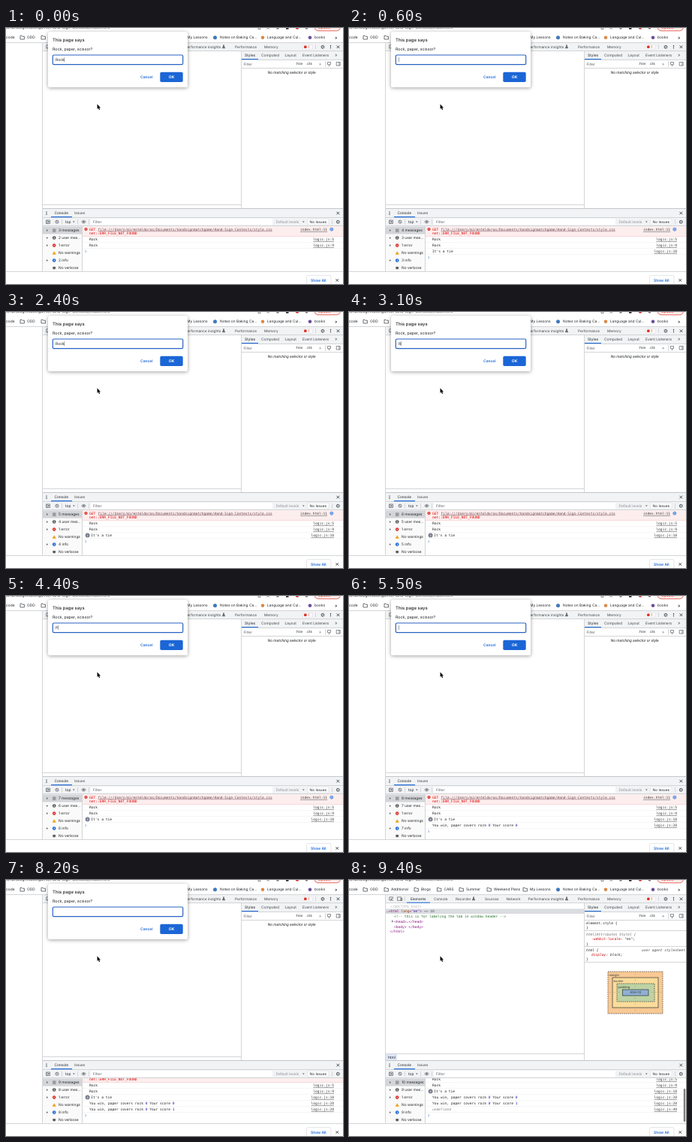
Recreate the animation shown at these times as an HTML page. Size 449 px wide and 341 px high, loop 9.5 s.

```html
<!DOCTYPE html>
<html lang="en">
<head>
<meta charset="utf-8">
<title>Prompt game</title>
<style>
html, body { margin: 0; width: 100%; height: 100%; overflow: hidden; background: #fff; }
svg { display: block; width: 449px; height: 341px; font-family: Inter, Roboto, sans-serif; text-rendering: geometricPrecision; }
.mono { font-family: "DejaVu Sans Mono", monospace; }
.it { font-style: italic; }
.slanted { font-family: Roboto, sans-serif; font-style: italic; }
.link { text-decoration: underline; text-decoration-thickness: .4px; }
.card { filter: drop-shadow(0 1.2px 2.6px rgba(0, 0, 0, .38)); }
</style>
</head>
<body>
<svg viewBox="0 0 449 341">
  <g id="chrome"></g><g id="elements"></g><g id="console"></g><g id="frame"></g><g id="dialog"></g><g id="pointer"></g>
</svg>
<script>
const LOOP = 9500, STEP = 100;
const BLUE = '#1a66d6', RED = '#d93025', GREY = '#5c6166', INK = '#202327', TAB = '#43474b', BAR = '#f1f3f4', EDGE = '#d3d5d8';

// One entry per prompt: when it opens, the keystroke times and when it is confirmed
const rounds = [
  { open: -1000, word: 'Rock', keys: [-400, -300, -200, -100], close: 100 },
  { open: 500, word: 'Rock', keys: [800, 900, 1000, 1000], close: 1100 },
  { open: 1300, word: 'Rock', keys: [2000, 2100, 2200, 2400], close: 2500 },
  { open: 2800, word: 'Rock', keys: [3100, 3200, 3300, 3400], close: 3600 },
  { open: 3900, word: 'Paper', keys: [4200, 4600, 4700, 4800, 4900], close: 5000 },
  { open: 5300, word: 'Paper', keys: [6000, 6100, 6200, 6300, 6600], close: 7100 },
  { open: 7400, word: 'Paper', keys: [8400, 8600, 8700, 8800, 8900], close: 9000 },
];

const esc = s => s.replace(/&/g, '&amp;').replace(/</g, '&lt;');
const rect = (x, y, w, h, fill, more = '') => `<rect x="${x}" y="${y}" width="${w}" height="${h}" fill="${fill}" ${more}/>`;
const circle = (x, y, r, fill, more = '') => `<circle cx="${x}" cy="${y}" r="${r}" fill="${fill}" ${more}/>`;
const path = (d, stroke = GREY, w = .7, fill = 'none') => `<path d="${d}" stroke="${stroke}" stroke-width="${w}" fill="${fill}"/>`;
const hline = (x, y, w, c = EDGE) => rect(x, y, w, 1, c);
const vline = (x, y, h, c = EDGE) => rect(x, y, 1, h, c);
const span = (s, fill) => `<tspan fill="${fill}">${esc(s)}</tspan>`;
// y is the middle of the line of text
const raw = (x, y, markup, size, fill, more = '') =>
  `<text x="${x}" y="${y + size * .36}" font-size="${size}" fill="${fill}" ${more}>${markup}</text>`;
const text = (x, y, s, fill = INK, size = 4.85, more = '') => raw(x, y, esc(s), size, fill, more);
const mono = (x, y, s, fill = '#222', cls = '', more = '') =>
  raw(x, y, esc(s), 4.6, fill, `class="mono ${cls}" ${more}`);
const link = (x, y, s) => mono(x, y, s, '#3c3c3c', 'link', 'text-anchor="end"');
const cross = (x, y, c = INK) => path(`M${x - 1.8} ${y - 1.8}l3.6 3.6m0 -3.6l-3.6 3.6`, c, .8);
const folder = x => path(`M${x} 10.3h2l.8 .9h2.6v3.8h-5.4z`, '#4b4f54', .8);
const dots = (x, y) => [-1.8, 0, 1.8].map(d => circle(x, y + d, .6, INK)).join('');
const gear = (x, y) => circle(x, y, 1.9, 'none', `stroke="${GREY}" stroke-width="1.1" stroke-dasharray="1 .35"`) + circle(x, y, 1.4, 'none', `stroke="${GREY}" stroke-width=".7"`);
const flask = x => path(`M${x - .5} 22.7v1.5l-1.3 2.6h3.6l-1.3 -2.6v-1.5z`, GREY, .6, GREY);
const arrow = (x, y) => path(`M${x} ${y - 1.4}l2 1.4l-2 1.4z`, 'none', 0, GREY);
const down = (x, y) => path(`M${x} ${y - .8}h2.6l-1.3 1.7z`, 'none', 0, GREY);

function browserBar() {
  const marks = [[28, 'ODD'], [56, 'Additional'], [96, 'Blogs'], [126.5, 'CARS'], [156, 'Summer'], [193, 'Weekend Plans'], [241, 'My Lessons']];
  return text(0, -1.2, 's/handsignmatchgame/Hand-Sign-Contests/index.html', '#444', 5.3)
    + path('M336 -1v2.5h3v-2.5M347.5 1.3l1.7 -1l1.7 1') + rect(360.5, -1, 3, 2.5, '#777')
    + rect(373, -1, 3.5, 2.6, '#222') + circle(388, -.3, 2.1, RED) + rect(399, -1, 3, 2.4, '#777')
    + rect(411, -7, 34.5, 10.8, '#fdeceb', `rx="5" stroke="${RED}" stroke-width=".7"`) + text(416, -1, 'Update', RED)
    + text(0, 12.7, 'code') + marks.map(([x, s]) => folder(x - 9) + text(x, 12.7, s)).join('')
    + circle(278.5, 12.7, 2.5, '#3f78bd') + text(285, 12.7, 'Notes on Baking Ca...')
    + circle(342, 12.7, 2.3, '#d98a4a') + text(348, 12.7, 'Language and Cul...')
    + circle(405, 12.7, 2.3, '#6b4d9b') + text(411, 12.7, 'books') + text(438, 12.5, '»', INK, 6)
    + hline(0, 19, 449);
}

function toolbars() {
  const tabs = [[82, 'Elements'], [113, 'Console'], [142, 'Recorder'], [181, 'Sources'], [209.5, 'Network'],
    [238.5, 'Performance insights'], [305, 'Performance'], [344, 'Memory']];
  const panes = [[318, 'Styles'], [340, 'Computed'], [371.5, 'Layout'], [395, 'Event Listeners']];
  return rect(49, 20, 400, 11, BAR) + hline(49, 30, 400)
    + path('M57 27h-3.2v-4.2h4.6v2M56 25l3 3M56 25v2.2M56 25h2.2') + path('M64.5 22.8h5v4.5h-5zM69 24.3h2v3h-2z') + vline(74, 22, 6)
    + tabs.map(([x, s]) => text(x, 25.1, s, x < 90 ? INK : TAB, 4.75)).join('')
    + rect(77, 29.6, 31, 1, BLUE) + flask(166) + flask(290)
    + rect(395, 22.2, 13, 6, '#fff', `rx="1" stroke="${EDGE}" stroke-width=".5"`) + circle(398.8, 25.2, 1.9, RED) + text(402.5, 25.2, '1', RED)
    + vline(412, 22, 6) + gear(422, 25.2) + dots(432.5, 25.2) + cross(442.5, 25.2)
    + rect(314, 31, 135, 11, BAR) + hline(314, 42, 135)
    + panes.map(([x, s]) => text(x, 36.4, s, x < 330 ? INK : TAB)).join('')
    + rect(314, 41, 22, 1, BLUE) + text(438, 36, '»', GREY, 6)
    + text(316.5, 47.8, 'Filter', GREY) + text(386, 47.8, ':hov', INK, 4.7) + text(400, 47.8, '.cls', INK, 4.7)
    + text(416.5, 47.5, '+', '#888', 6.5) + path('M428.5 45.5h4v3.3h-4zM430.5 48.8v2.4M443.8 45.5v4.6') + path('M440.2 45.5h5v4.6h-5z') + vline(425, 44, 8)
    + hline(314, 53, 135) + vline(313, 31, 209);
}

function drawer() {
  return rect(49, 241, 400, 12, BAR) + hline(49, 240, 400, '#c4c6c9') + dots(54, 246.6)
    + text(64.5, 246.6, 'Console', INK, 4.75) + text(91, 246.6, 'Issues', TAB, 4.75)
    + rect(60, 251.3, 28, 1, BLUE) + cross(442.3, 246.6) + hline(49, 252, 400) + rect(60, 251.3, 28, 1, BLUE)
    + rect(49, 253, 400, 11, BAR)
    + path('M53.5 256h5v4.5h-5zM55 256v4.5') + arrow(56, 258.2)
    + circle(68, 258.2, 2, 'none', `stroke="${GREY}" stroke-width=".8"`) + path('M66.6 256.8l2.8 2.8')
    + vline(74, 255, 6.5) + text(79, 258.2, 'top') + down(89, 258.4) + vline(95, 255, 6.5)
    + path('M100.7 258.2q2.8 -3.6 5.6 0q-2.8 3.6 -5.6 0z') + circle(103.5, 258.2, 1.1, GREY)
    + vline(110, 255, 6.5) + rect(113, 254, 242, 8.5, '#fff') + text(116, 258.2, 'Filter', GREY)
    + text(359.5, 258.2, 'Default levels', '#8d9196') + down(395, 258.4)
    + rect(401.5, 254.3, 28.5, 7.8, '#fff', `rx="1" stroke="${EDGE}" stroke-width=".5"`) + text(404.5, 258.2, 'No Issues')
    + vline(434, 255, 6.5) + gear(442.3, 258.2) + hline(49, 263, 400)
    + vline(48, 20, 304) + hline(0, 324, 449)
    + rect(0, 325, 449, 16, '#fff')
    + rect(400.5, 329.5, 32.5, 13, '#fff', `rx="2" stroke="${EDGE}" stroke-width=".6"`)
    + text(406, 336, 'Show All', BLUE, 4.9, 'font-weight="600"') + cross(441.3, 336);
}

function emptyElements() {
  return hline(49, 235, 264) + text(348.8, 59.2, 'No matching selector or style', INK, 5.05, 'class="slanted"');
}

function filledElements() {
  const tag = '#881280', code = (x, y, ...parts) => raw(x, y, parts.join(''), 4.6, '#222', 'class="mono"');
  const boxes = [[345, 122, 73, 56, '#f8c994', 'margin'], [351, 130, 61, 40, '#fbdc9b', 'border'],
    [357, 138, 50, 24, '#bdd3a4', 'padding'], [364.5, 146, 34.5, 8, '#8fb0d4', '']];
  return rect(49, 38.4, 264, 6.6, '#dadce0')
    + mono(55, 35, '<!DOCTYPE html>', '#b0b0b0')
    + code(50, 41.6, span('…', GREY), span('<html ', tag), span('lang', '#994500'), span('="', tag), span('en', '#1a1aa6'), span('">', tag), span(' == $0', GREY))
    + mono(60, 48.2, '<!-- this is for labeling the tab in window header -->', '#236e25')
    + arrow(57, 55) + code(60, 55, span('<head>', tag), span('…', GREY), span('</head>', tag))
    + mono(60, 62, '<body> </body>', tag) + mono(54.5, 68.6, '</html>', tag)
    + hline(49, 231, 264) + rect(49, 232, 15, 8, '#dfe7f5') + text(52, 236.2, 'html', INK)
    + mono(316, 57, 'element.style {') + mono(316, 63.7, '}') + hline(314, 67, 135)
    + mono(316, 72.2, 'html[Attributes Style] {', '#666', 'it')
    + code(323, 78.7, span('-webkit-locale', '#c80000'), span(': "en";', '#222')) + mono(316, 85, '}') + hline(314, 88, 135)
    + mono(316, 93, 'html {', '#222', 'it') + mono(448, 93, 'user agent stylesheet', '#444', 'it', 'text-anchor="end"')
    + code(323, 99.4, '<tspan class="it">', span('display', '#c80000'), span(': block;', '#222'), '</tspan>')
    + mono(316, 105.5, '}') + hline(314, 109, 135)
    + boxes.map(([x, y, w, h, c, s], i) =>
      rect(x, y, w, h, c, `stroke="#333" stroke-width=".7" ${i % 2 ? '' : 'stroke-dasharray="1.6 1.2"'}`)
      + text(x + 1.6, y + 4.3, s, '#333', 4.1)
      + (s ? [[381.5, y + 4], [381.5, y + h - 4], [x + 3, 150], [x + w - 3, 150]]
        .map(([a, b]) => text(a, b, '-', '#444', 4, 'text-anchor="middle"')).join('') : '')).join('')
    + text(381.7, 150, '636×18', '#333', 4.1, 'text-anchor="middle"');
}

function sidebar(n) {
  const rows = [`${n} messages`, `${n - 1} user mes...`, '1 error', 'No warnings', `${n - 1} info`, 'No verbose'];
  const icons = [
    y => path(`M62 ${y - 1.5}h4.5m-4.5 1.6h4.5m-4.5 1.6h4.5`, '#555', .7),
    y => circle(64.2, y, 2.3, '#444') + circle(64.2, y - .6, .8, '#fff') + path(`M62.8 ${y + 1.3}h2.8`, '#fff', .7),
    y => circle(64.2, y, 2.3, RED) + path(`M63.3 ${y - .9}l1.8 1.8m0 -1.8l-1.8 1.8`, '#fff', .5),
    y => path(`M64.2 ${y - 2.3}l2.6 4.4h-5.2z`, 'none', 0, '#f0a020'),
    y => circle(64.2, y, 2.3, BLUE) + rect(63.9, y - 1.2, .7, 2.5, '#fff'),
    y => circle(64.2, y, 1.7, '#555') + path(`M62 ${y - 1.2}h4.4m-4.4 1.2h4.4m-4.4 1.2h4.4`, '#555', .5),
  ];
  return rect(49, 264, 52, 60, '#fafafa') + rect(49, 264.5, 52, 10, '#d3d5d8')
    + rows.map((s, i) => {
      const y = 269.6 + 10 * i;
      return (i < 3 || i === 4 ? arrow(54, y) : '') + icons[i](y) + text(70, y, s, INK, 4.85);
    }).join('')
    + vline(101, 264, 60);
}

function consoleLog(n, t) {
  const pitch = 8, scroll = Math.max(0, n - 8) * pitch, url = 'file:///Users/mirenteldoras/Documents/handsignmatchgame/Hand-Sign-Contests/style.css';
  const win = score => 'You win, paper covers rock ' + span('0', '#1a1aa6') + ' Your score ' + span(score, '#1a1aa6');
  const rows = [['Rock', 5], ['Rock', 9]];
  const ties = Math.min(n - 3, 4);
  if (ties > 0) rows.push(["It's a tie", 18]);
  if (n > 7) rows.push([win('0'), 28]);
  if (n > 8) rows.push([win('1'), 28]);
  if (n > 9) rows.push([span('undefined', '#808080'), 49]);
  let out = rect(102, 264, 347, 13, '#fdeeee') + hline(102, 277, 347, '#f7dada')
    + circle(106.5, 268.1, 2.1, RED) + path('M105.7 267.3l1.6 1.6m0 -1.6l-1.6 1.6', '#fff', .5)
    + mono(111, 268, 'GET', '#d00') + mono(122.5, 268, url, '#66414a', 'link')
    + mono(111, 273.2, 'net::ERR_FILE_NOT_FOUND', '#d00') + link(428, 268.6, 'index.html:11')
    + circle(433.8, 268.2, 2, '#dce8fb', `stroke="${BLUE}" stroke-width=".7"`) + path('M432 268.2h3.6M433.8 266.4v3.6', BLUE, .5);
  rows.forEach(([markup, line], i) => {
    const y = 281.6 + pitch * i, badge = i === 2 && ties > 1;
    if (badge) out += circle(108.6, y - .2, 2.9, '#74788c') + text(108.6, y - .2, String(ties), '#fff', 4, 'text-anchor="middle"');
    out += raw(badge ? 113.3 : 111, y, markup, 4.6, '#222', 'class="mono"') + link(437, y, 'logic.js:' + line) + hline(102, 285 + pitch * i, 347, '#f5f5f5');
  });
  const y = 281.6 + pitch * rows.length;
  out += path(`M105.5 ${y - 1.4}l1.5 1.4l-1.5 1.4`, '#4a78c8', .7);
  const bar = n > 9 || n === 9 && t < 7700 ? rect(445.8, n > 9 ? 278 : 272, 2.4, 44, '#7c7c7c', 'rx="1.2"') : '';
  return `<svg x="0" y="264" width="449" height="60" viewBox="0 264 449 60"><g transform="translate(0 ${-scroll})">${out}</g>${bar}</svg>`;
}

function prompt(t) {
  const r = rounds.find(r => t >= r.open && t <= r.close);
  if (!r) return '';
  const show = t === r.close ? .5 : t === r.open ? .8 : 1;
  const keys = r.keys.filter(k => k <= t), typed = r.word.slice(0, keys.length);
  const caret = (t - (keys.length ? keys[keys.length - 1] : r.open)) % 1000 < 500;
  const shift = show < 1 ? 'translate(149 38.7) scale(.985) translate(-149 -42)' : '';
  return `<g opacity="${show}" transform="${shift}">` + rect(56, 5, 186, 74, '#fff', 'rx="2.5" class="card"')
    + text(62, 16, 'This page says', '#202124', 5.95, 'font-weight="500"') + text(62, 28.2, 'Rock, paper, scissor?', '#202124', 5.3)
    + rect(62.3, 36, 173.4, 12.6, '#fff', 'rx="1.6" stroke="#2a62c4" stroke-width="1.2"')
    + raw(66, 42.2, typed + (caret ? `<tspan dx="${typed ? -.7 : 0}" fill="#000">|</tspan>` : ''), 5, '#202124')
    + text(187.3, 65.4, 'Cancel', BLUE, 4.9, 'text-anchor="middle" font-weight="600"')
    + rect(205.3, 58.7, 30.4, 13.4, BLUE, 'rx="1.8"')
    + text(220.5, 65.4, 'OK', '#fff', 5.1, 'text-anchor="middle" font-weight="700"') + '</g>';
}

const put = (id, markup) => { document.getElementById(id).innerHTML = markup; };
put('chrome', browserBar() + toolbars());
put('frame', drawer());
put('pointer', path('M121.6 101.6v6.2l1.4 -1.2l1 2.3l1.1 -.5l-1 -2.2h1.8z', '#fff', .9, '#000')
  + path('M121.6 101.6v6.2l1.4 -1.2l1 2.3l1.1 -.5l-1 -2.2h1.8z', 'none', 0, '#000'));

let last = -1;
function draw(now) {
  const t = Math.floor(now % LOOP / STEP) * STEP;
  if (t !== last) {
    last = t;
    const n = 3 + rounds.filter(r => t > r.close).length;
    put('elements', t >= 9200 ? filledElements() : emptyElements());
    put('console', sidebar(n) + consoleLog(n, t));
    put('dialog', prompt(t));
  }
  requestAnimationFrame(draw);
}
draw(0);
</script>
</body>
</html>
```
